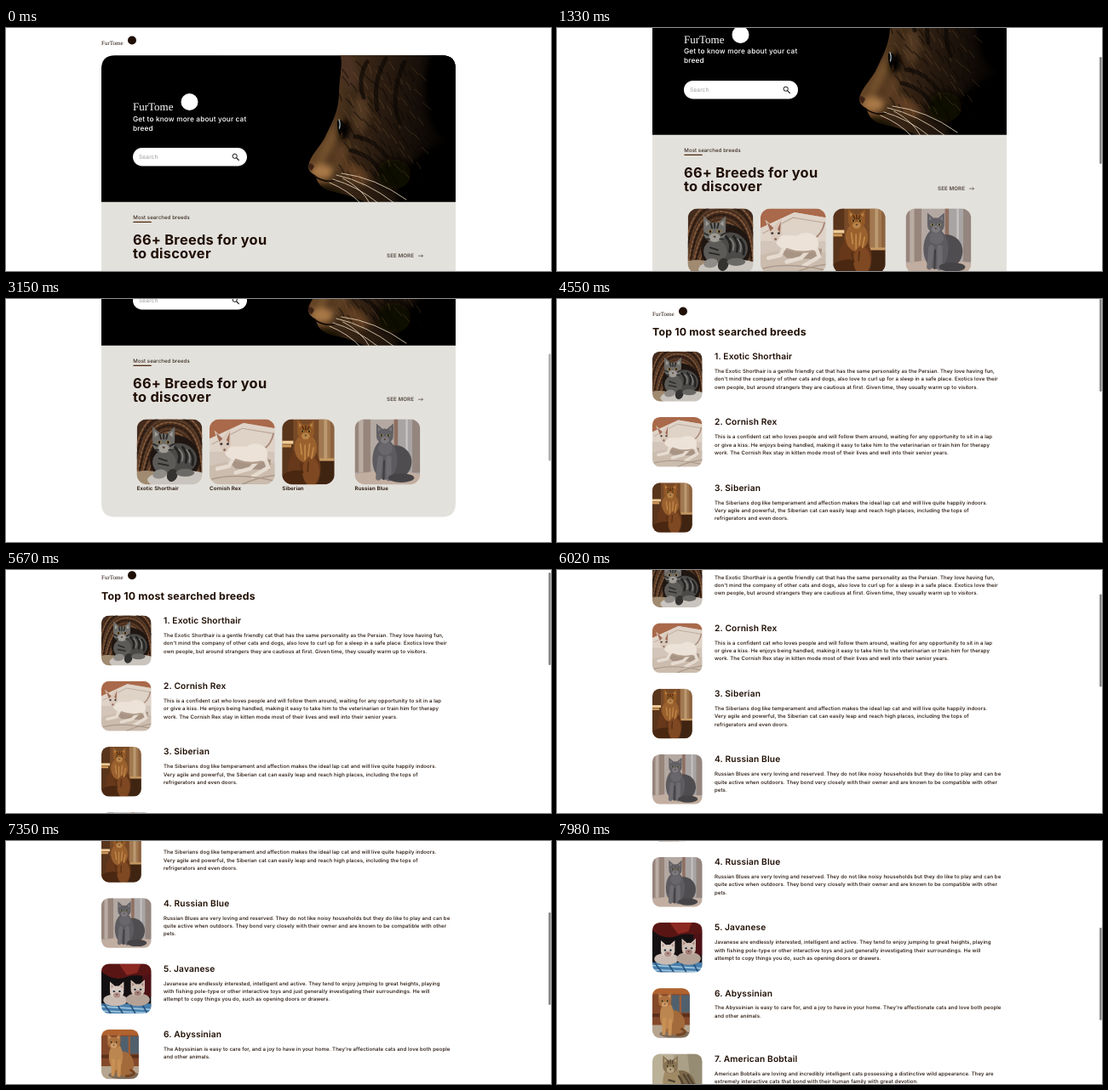
Write an HTML page that moves like this. It is 640 px wide and 286 px high and loops after 8000 ms.

```html
<!DOCTYPE html>
<html lang="en">
<head>
<meta charset="utf-8">
<title>Cat breeds</title>
<style>
  html, body { margin: 0; width: 100%; height: 100%; overflow: hidden; background: #fff; }
  svg { display: block; width: 100vw; height: 100vh; }
  text { font-family: Inter, "Open Sans", sans-serif; letter-spacing: .015em; text-rendering: geometricPrecision; fill: #1f0e04; }
  .mark { font-family: "Liberation Serif", serif; letter-spacing: 0; }
</style>
</head>
<body>
<svg id="stage" viewBox="0 0 640 286" xmlns="http://www.w3.org/2000/svg"></svg>
<script>
const LOOP = 8000, STEP = 70, INK = "#1f0e04";

const text = (x, y, size, weight, str, extra = "") =>
  `<text x="${x}" y="${y}" font-size="${size}" font-weight="${weight}" ${extra}>${str}</text>`;
const rect = (x, y, w, h, fill, extra = "") =>
  `<rect x="${x}" y="${y}" width="${w}" height="${h}" fill="${fill}" ${extra}/>`;
const oval = (x, y, rx, ry, fill, turn = 0) =>
  `<ellipse cx="${x}" cy="${y}" rx="${rx}" ry="${ry}" fill="${fill}" transform="rotate(${turn} ${x} ${y})"/>`;
const shape = (d, fill, extra = "") => `<path d="${d}" fill="${fill}" ${extra}/>`;
const line = (d, stroke, width, extra = "") =>
  `<path d="${d}" fill="none" stroke="${stroke}" stroke-width="${width}" stroke-linecap="round" ${extra}/>`;

// Cat head with ears, eyes and nose, r = half width
const head = (x, y, r, fur, inner, eye) =>
  `<g transform="translate(${x} ${y}) scale(${r / 10})">` +
  shape("M-10 -2L-10 -15L-2 -8H2L10 -15L10 -2Z", fur) + shape("M-8 -5L-8 -11L-4 -7ZM8 -5L8 -11L4 -7Z", inner) +
  oval(0, 0, 10, 9, fur) + oval(0, 4.5, 5, 4, inner) +
  oval(-4, -1, 2, 1.3, eye) + oval(4, -1, 2, 1.3, eye) +
  oval(-4, -1, 1, 1.2, "#181512") + oval(4, -1, 1, 1.2, "#181512") +
  shape("M-1.500 3H1.500L0 5Z", "#4d352f") + "</g>";

const wicker = () => {
  let weave = "";
  for (let i = 0; i < 13; i++)
    weave += line(`M${-6 + i * 2} 100Q${i * 4 - 6} ${i * 5 - 14} 54 ${i * 5 - 10}T${106 - i * 2} 100`,
      ["#80583a", "#2a1a11", "#5e3f29"][i % 3], 2.6, `stroke-dasharray="4 3" stroke-dashoffset="${i * 3}"`);
  return weave;
};

// Breed pictures, 100 units high
const photos = {
  exotic: { w: 100, art: rect(0, 0, 100, 100, "#432b1d") + wicker() + oval(58, 62, 38, 38, "#1f1612") +
    oval(14, 95, 34, 16, "#a08a70") + oval(66, 93, 50, 15, "#c9c4bd") + oval(66, 60, 26, 23, "#4b4a48", 15) +
    line("M58 43Q68 52 64 66M70 43Q79 53 75 66M80 48Q89 57 85 70", "#232322", 4) +
    line("M64 46Q73 53 69 64M76 47Q84 56 80 66", "#85827d", 2) +
    oval(42, 66, 18, 18, "#5d5b58") + oval(35, 84, 11, 7, "#8f8c87", -10) + oval(54, 86, 8, 10, "#343331", 20) + oval(74, 82, 14, 6, "#6b6965") +
    head(41, 37, 17, "#6f6d69", "#a19d97", "#a9823e") +
    line("M35 23L37 30M41 22V30M47 23L45 30M25 38L31 41M57 38L51 41M28 47L33 47M54 47L49 47M34 60L46 64M33 68L48 71", "#292826", 2.4) },
  cornish: { w: 100, art: rect(0, 0, 100, 100, "#d3c5b9") + shape("M0 0H100V14L52 6L0 30Z", "#a9694a") +
    shape("M0 30L52 6L100 14V50H0Z", "#dfd3c8") + line("M4 38L50 14L98 22", "#baa797", 1.5) +
    shape("M0 72Q40 58 100 68V100H0Z", "#cbbcae") + shape("M30 66Q60 56 94 62L92 78L40 76Z", "#a89484") +
    line("M82 46Q94 40 98 22", "#a98978", 2.5) + line("M38 56L30 72L12 76M76 62L62 76L40 82M84 58L90 74L66 88", "#e6dbd0", 6) +
    shape("M22 44Q40 40 56 42Q72 32 86 44Q94 60 80 66Q58 70 36 62Q22 58 22 44Z", "#ece2d8") + line("M40 62Q60 70 80 65", "#b29c8b", 3) +
    shape("M15 40L7 17L20 28L32 15L33 40L25 51H20Z", "#d9c8ba") + shape("M15 35L10 21L20 30ZM26 32L31 20L30 37Z", "#9d6a55") +
    oval(18, 38, 2, 1.8, "#3a3232") + oval(28, 38, 2, 1.8, "#3a3232") + oval(23, 47, 2, 2, "#8d6d60") +
    line("M4 92Q40 82 96 94M50 100Q70 90 100 86", "#ab9989", 2) },
  siberian: { w: 80, art: rect(0, 0, 80, 100, "#774a28") + rect(0, 0, 17, 100, "#59351c") + rect(56, 0, 24, 66, "#a17850") +
    rect(64, 0, 5, 66, "#bb9a72") + rect(74, 0, 6, 66, "#8c633f") + rect(0, 33, 17, 5, "#f0cb97") + rect(0, 39, 14, 4, "#d09a58") +
    shape("M50 62H80V100H48Z", "#3f2412") + rect(54, 60, 26, 4, "#c79a63") + oval(34, 76, 25, 36, "#67381a") + oval(36, 44, 17, 22, "#9a602e") +
    oval(18, 94, 26, 15, "#4a2711", -12) + oval(44, 80, 13, 22, "#7e4822") +
    head(36, 20, 13, "#935927", "#b88449", "#b78b3a") + line("M28 38L30 54M35 40V62M42 38L40 56M48 44L45 60", "#bf8648", 2.4) +
    line("M31 11L33 16M36 10V16M41 11L39 16M28 68L32 82M40 66L39 80", "#532d13", 2) },
  russian: { w: 100, art: rect(0, 0, 100, 100, "#b4a9a2") + rect(0, 0, 24, 82, "#97857b") + rect(6, 0, 7, 82, "#b9aca3") +
    rect(66, 0, 34, 82, "#a9a4a4") + rect(60, 0, 6, 82, "#8f6f61") + rect(78, 0, 3, 82, "#c9c5c5") + rect(88, 0, 12, 82, "#94857e") +
    oval(50, 97, 65, 18, "#c2aea0") + oval(62, 66, 25, 26, "#4f4d50", 12) + oval(46, 62, 19, 31, "#5d5b5f") +
    line("M39 60L36 90M52 60V91", "#6d6b6f", 8) + line("M45 64L44 92", "#3f3d40", 2.5) + oval(71, 90, 20, 7, "#454346") +
    oval(47, 45, 11, 10, "#69676b") + head(46, 26, 13, "#626064", "#7e7a7d", "#a9a66c") },
  javanese: { w: 100, art: rect(0, 0, 100, 100, "#141012") + shape("M0 0H100V30Q73 18 49 27T0 16Z", "#591514") +
    shape("M35 0H79L72 18L51 23Z", "#8c2822") + shape("M82 25L100 20V66H85Z", "#4d1216") + rect(0, 80, 100, 20, "#487eab") +
    line("M0 86L100 92M0 95L100 99", "#9dc5dc", 3) + line("M5 81L19 100M31 81L43 100M58 82L68 100M82 82L92 100", "#28537d", 3) +
    oval(28, 73, 24, 12, "#c9bbb2") + oval(73, 72, 24, 13, "#b4a297") +
    head(31, 57, 14, "#d9cbc2", "#b3928b", "#5f7789") + head(73, 53, 14, "#cfbeb3", "#a58079", "#5f7789") },
  abyssinian: { w: 75, art: rect(0, 0, 75, 100, "#84492a") + rect(0, 0, 75, 12, "#b0622f") + rect(38, 14, 37, 35, "#51606d") +
    rect(54, 14, 4, 35, "#a05d38") + rect(0, 51, 75, 7, "#5b301b") + rect(0, 74, 75, 26, "#b6a58f") +
    oval(45, 92, 31, 8, "#7d6d5b") + oval(43, 69, 22, 25, "#a2693a", -14) + oval(29, 55, 14, 27, "#bb864f") +
    line("M24 62L23 91M36 64L35 92", "#c99055", 7) + line("M59 82Q76 91 50 94", "#75431f", 5) +
    head(25, 27, 13, "#ab7040", "#cd9b67", "#a8914b") },
  bobtail: { w: 100, art: rect(0, 0, 100, 100, "#aaa087") + rect(0, 0, 42, 100, "#bbb198") + shape("M70 0H100V100H82Z", "#968c74") +
    oval(50, 97, 65, 18, "#c1ad88") + oval(59, 65, 28, 32, "#7c6849", -18) + oval(39, 57, 18, 33, "#a08a66") +
    line("M53 45L63 63M63 42L74 60M71 43L82 61M33 53L44 56M33 64L44 67", "#514431", 4) +
    head(36, 26, 15, "#8a7456", "#b5a37f", "#a19450") + line("M31 13L32 20M36 12V20M41 13L40 20", "#4e402e", 2) }
};
const photo = (name, x, y, size) =>
  `<g transform="translate(${x} ${y}) scale(${size / 100})" clip-path="url(#round${photos[name].w})"><g filter="url(#lens)">${photos[name].art}</g></g>`;

const logo = (x, y, size, cx, cy, r, fill) =>
  `<text class="mark" x="${x}" y="${y}" font-size="${size}" style="fill:${fill}">FurTome</text><circle cx="${cx}" cy="${cy}" r="${r}" fill="${fill}"/>`;
const header = logo(112, 19.5, 7, 148, 14.5, 5, INK);

// Short hairs that follow the head, paler near the lit left edge
const fur = () => {
  let pale = "", dark = "";
  for (let i = 0; i < 110; i++) {
    const x = 388 + (i * 37) % 104, y = 36 + (i * 53) % 138;
    const hair = `M${x} ${y}q4 4 ${5 + i % 5} ${8 + i % 7}`;
    if (i % 2) dark += hair;
    else if (x + y > 455) pale += hair;
  }
  return line(pale, "#b5854f", .7, 'opacity=".35"') + line(dark, "#0a0604", 1.5, 'opacity=".5"');
};
const hero = `<g clip-path="url(#heroClip)">` + rect(112, 32, 416, 174, "#000") +
  `<g clip-path="url(#faceClip)">` + rect(350, 32, 178, 174, "url(#face)") + `<g filter="url(#soft)">` +
  oval(401, 50, 11, 22, "#4b3320", -12) + oval(380, 134, 6, 30, "#76522f", 26) + oval(371, 169, 13, 9, "#a87846") +
  oval(392, 151, 9, 16, "#5b3c20", 15) + oval(411, 172, 17, 10, "#5e3e20", 35) + oval(417, 100, 9, 22, "#513720") +
  oval(396, 120, 8, 13, "#050403", 10) + oval(380, 192, 18, 6, "#120b06", 15) +
  oval(512, 180, 58, 40, "#000", -35) + oval(520, 70, 28, 60, "#000") + oval(455, 172, 20, 18, "#0d0805") + "</g>" + fur() +
  line("M424 40Q412 60 420 82M446 36Q430 64 436 96M410 128Q432 130 447 152M405 144Q430 150 440 170M468 40Q450 78 462 112", "#090604", 5, 'opacity=".6"') +
  shape("M389 109Q395 106 398 117L392 126Q388 118 389 109Z", "#080605") + "</g>" +
  line("M391 108Q393 112 391.500 118", "#a9b8c0", 1.3) +
  shape("M355 160Q359 158 362 163L359 168Q355 166 355 160Z", "#3b2215") +
  line("M362 174Q374 183 388 179", "#140a05", 1.6) +
  line("M384 178Q412 186 437 206M388 173Q424 181 456 206M394 171Q434 176 470 202M380 182Q402 191 416 206M396 177Q418 189 427 206", "#eddcc0", .9, 'opacity=".9"') +
  `</g>` +
  logo(149, 97, 13, 215.500, 87, 10, "#fff") +
  text(149, 109.5, 8.3, 500, "Get to know more about your cat", 'style="fill:#fff"') +
  text(149, 120.5, 8.3, 500, "breed", 'style="fill:#fff"') +
  rect(149, 141, 134, 21.5, "#fff", 'rx="10.75"') + text(156, 154.4, 6.6, 400, "Search", 'style="fill:#9b9b9b"') +
  `<circle cx="268.7" cy="150.8" r="2.6" fill="none" stroke="#111" stroke-width="1"/>` + line("M270.800 153L273.400 155.700", "#111", 1.1);

const popular = [["exotic", "Exotic Shorthair"], ["cornish", "Cornish Rex"], ["siberian", "Siberian"], ["russian", "Russian Blue"]];
const home = header + hero +
  shape("M112 204.800H528V390.500Q528 406.500 512 406.500H128Q112 406.500 112 390.500Z", "#e3e1dc") +
  text(149.3, 225.2, 6.1, 400, "Most searched breeds") + rect(149.3, 227.8, 21.5, 1.3, "#4d270c", 'rx=".6"') +
  text(149, 255, 16.4, 700, "66+ Breeds for you") + text(149, 271, 16.4, 700, "to discover") +
  `<g opacity=".65">` + text(447, 270.4, 6.2, 700, "SEE MORE") + line("M484.500 268.200H489.500M488.100 266.900L489.500 268.200L488.100 269.500", INK, .8) + "</g>" +
  popular.map(([name, label], i) => {
    const x = 153.7 + i * 85.3;
    return photo(name, x, 291.5, 76.7) + text(x, 374.6, 6.2, 600, label);
  }).join("");

const breeds = [
  ["exotic", "Exotic Shorthair", "The Exotic Shorthair is a gentle friendly cat that has the same personality as the Persian. They love having fun,|don't mind the company of other cats and dogs, also love to curl up for a sleep in a safe place. Exotics love their|own people, but around strangers they are cautious at first. Given time, they usually warm up to visitors."],
  ["cornish", "Cornish Rex", "This is a confident cat who loves people and will follow them around, waiting for any opportunity to sit in a lap|or give a kiss. He enjoys being handled, making it easy to take him to the veterinarian or train him for therapy|work. The Cornish Rex stay in kitten mode most of their lives and well into their senior years."],
  ["siberian", "Siberian", "The Siberians dog like temperament and affection makes the ideal lap cat and will live quite happily indoors.|Very agile and powerful, the Siberian cat can easily leap and reach high places, including the tops of|refrigerators and even doors."],
  ["russian", "Russian Blue", "Russian Blues are very loving and reserved. They do not like noisy households but they do like to play and can be|quite active when outdoors. They bond very closely with their owner and are known to be compatible with other|pets."],
  ["javanese", "Javanese", "Javanese are endlessly interested, intelligent and active. They tend to enjoy jumping to great heights, playing|with fishing pole-type or other interactive toys and just generally investigating their surroundings. He will|attempt to copy things you do, such as opening doors or drawers."],
  ["abyssinian", "Abyssinian", "The Abyssinian is easy to care for, and a joy to have in your home. They're affectionate cats and love both people|and other animals."],
  ["bobtail", "American Bobtail", "American Bobtails are loving and incredibly intelligent cats possessing a distinctive wild appearance. They are|extremely interactive cats that bond with their human family with great devotion."]
];
const list = header + text(112, 43.4, 12.3, 700, "Top 10 most searched breeds") +
  breeds.map(([name, title, body], i) => {
    const y = 61.8 + i * 77.2;
    return photo(name, 112, y, 58.6) + text(185, y + 9.4, 10.2, 600, `${i + 1}. ${title}`) +
      body.split("|").map((row, k) => text(185, y + 25.3 + k * 9.3, 6.05, 500, row)).join("");
  }).join("");

const stage = document.getElementById("stage");
stage.innerHTML = `<defs>
  <linearGradient id="face" gradientUnits="userSpaceOnUse" x1="358" y1="110" x2="520" y2="130">
    <stop offset="0" stop-color="#6b4828"/><stop offset=".25" stop-color="#3f2b19"/><stop offset=".5" stop-color="#291b10"/><stop offset=".75" stop-color="#150e08"/><stop offset="1" stop-color="#020101"/>
  </linearGradient>
  <filter id="soft" x="-20%" y="-20%" width="140%" height="140%"><feGaussianBlur stdDeviation="3.5"/></filter>
  <filter id="lens"><feGaussianBlur stdDeviation=".9"/></filter>
  <clipPath id="heroClip"><path d="M112 206V48.500Q112 32.300 128 32.300H512Q528 32.300 528 48.500V206Z"/></clipPath>
  <clipPath id="faceClip"><path d="M393 32C396 45 391 60 391 77C391 97 383 111 374 130C366 143 357 151 355 162C355 168 359 171 364 174C365 182 370 189 383 192C399 196 412 200 424 206H528V32Z"/></clipPath>
  ${[100, 80, 75].map(w => `<clipPath id="round${w}">${rect(0, 0, w, 100, "#000", 'rx="15"')}</clipPath>`).join("")}
</defs>` + rect(0, 0, 640, 286, "#fff") +
  `<g id="home">${home}</g><g id="list">${list}</g>` + rect(637.2, 0, 2.4, 100, "#7f7f7f", 'id="thumb" rx="1.2"');
const [homeEl, listEl, thumb] = ["home", "list", "thumb"].map(id => document.getElementById(id));

const ramp = (t, a, b) => Math.min(1, Math.max(0, (t - a) / (b - a)));
const flick = (t, a, b, power) => 1 - (1 - ramp(t, a, b)) ** power;

function draw(time) {
  const t = Math.floor((time % LOOP) / STEP) * STEP;
  const onList = t >= 4550;
  const scroll = onList
    ? 117 * flick(t, 5635, 6440, 1.63) + 157.6 * flick(t, 6844, 7980, 2)
    : 132 * flick(t, 950, 2100, 2.28) + 18 * flick(t, 2345, 2660, 2);
  const page = onList ? listEl : homeEl;
  homeEl.style.display = onList ? "none" : "";
  listEl.style.display = onList ? "" : "none";
  page.setAttribute("transform", `translate(0 ${-scroll})`);

  let visible = 0;
  if (t >= 5670) visible = 1;
  else if (onList) visible = 1 - ramp(t, 5040, 5320);
  else if (t >= 980) visible = 1 - ramp(t, 3080, 3290);
  thumb.setAttribute("y", scroll * (onList ? .371 : .43));
  thumb.setAttribute("height", onList ? 109 : 126);
  thumb.setAttribute("opacity", visible);
}

const start = performance.now();
function tick() {
  draw(performance.now() - start);
  requestAnimationFrame(tick);
}
tick();
</script>
</body>
</html>
```
